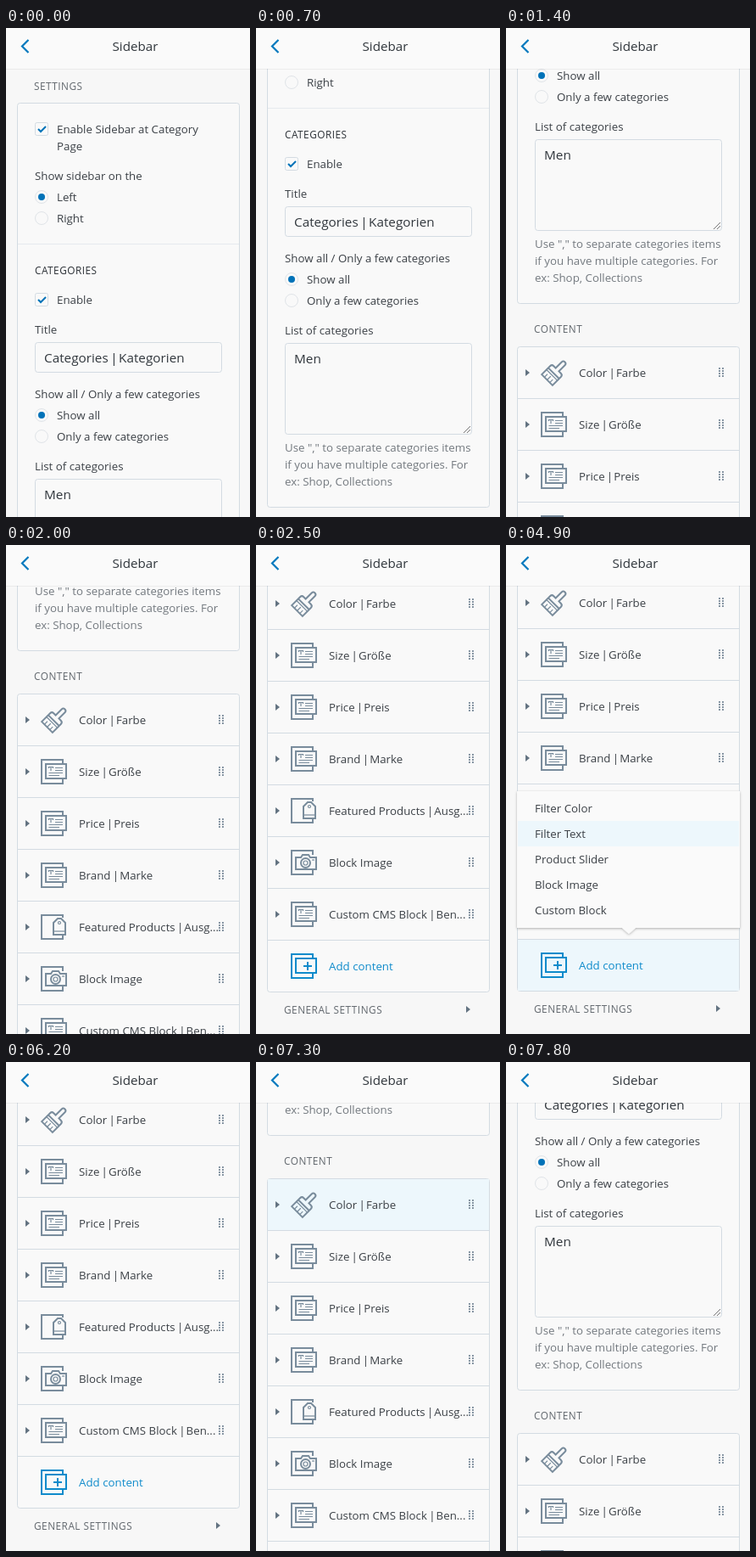
These frames come from a looping animation (288x576 px, 8 s). An HTML page:

```html
<!DOCTYPE html>
<html lang="en">
<head>
<meta charset="utf-8">
<style>
  html, body { margin: 0; width: 100%; height: 100%; overflow: hidden; background: #f7f7f7; }
  svg { display: block; }
  text { font: 13.3px "Open Sans", "Noto Sans", sans-serif; fill: #3b4046; white-space: pre; }
  .big { font-size: 15.3px; fill: #31373d; }
  .caps { font-size: 11.8px; letter-spacing: .5px; }
  .head { fill: #61676d; }
  .dark { fill: #2b3036; }
  .help { fill: #73797f; }
  .title { font-size: 15.2px; font-weight: 500; fill: #31373d; }
  .add { fill: #0f8bcb; }
  .card { fill: #f9f9f9; stroke: #d3dbe2; }
  .field { fill: #f9f9f9; stroke: #d3dbe2; }
  .ring { fill: #f9f9f9; stroke: #e0e4e8; }
  .line { stroke: #d3dbe2; }
  .faint { stroke: #e6eaee; }
  .icon { fill: none; stroke: #798c9c; stroke-width: 2; }
  .icon.add { fill: none; stroke: #0f8bcb; }
  .thin { stroke-width: 1.2; }
  .caret { fill: #637381; }
  .hot { fill: #edf7fc; }
</style>
</head>
<body>
<svg id="stage" width="288" height="576"></svg>
<script>
const LOOP = 8000, TICK = 100, END = 738;
const ROW = 61, LIST = 775;

// Text is placed by the middle of its capitals.
const text = (x, y, s, cls = '', drop = 5) =>
  `<text x="${x}" y="${y + drop}" class="${cls}">` +
  s.replace('| ', '<tspan dx="-.09em">|</tspan><tspan dx="-.18em"> </tspan>') + '</text>';
const caps = (x, y, s, cls = 'head') => text(x, y, s, 'caps ' + cls, 4);
const box = (x, y, w, h, cls, r = 3) =>
  `<rect x="${x + .5}" y="${y + .5}" width="${w - 1}" height="${h - 1}" rx="${r}" class="${cls}"/>`;
const rule = (y, cls = 'line') => `<path d="M14 ${y + .5}H275" class="${cls}"/>`;
const caret = (x, y) => `<path d="M${x} ${y - 4}l5 4l-5 4z" class="caret"/>`;

const check = (y, s) => box(34, y - 8, 16, 16, 'field', 2) +
  `<path d="M38 ${y}l3 3l6-6" fill="none" stroke="#0072b8" stroke-width="2"/>` + text(60, y, s);
const radio = (y, s, on) => `<circle cx="42" cy="${y}" r="7.5" class="ring"/>` +
  (on ? `<circle cx="42" cy="${y}" r="4" fill="#0072b8"/>` : '') + text(60, y, s);

const back = '<path d="M26 6V1H1V29H26V23"/>';
const front = back + '<path d="M6 6H30V23H6z"/>';
const icons = {
  brush: `<g transform="translate(16 15) rotate(45)">
    <path d="M-9 12V-2q0-3 3-3H-2.7V-15a2.7 2.7 0 0 1 5.4 0V-5H6q3 0 3 3V12zM-9 1H9"/>
    <path class="thin" d="M-9 4H9M-4.5 12V7M0 12V6M4.5 12V7"/></g>`,
  block: front + '<path class="thin" d="M9.5 11V9.5H14.5V11M12 9.5V14M17 10.5H26M17 13.5H26M9.5 16.5H26M9.5 19.5H22"/>',
  tag: '<path d="M26 4V1H1V29H26V25M15 24V10L20 5H24L29 10V24z"/><circle class="thin" cx="22" cy="10" r="1.5"/><path class="thin" d="M15 20H29"/>',
  camera: back + '<path d="M6 9H12L14 6H21L23 9H30V23H6z"/><circle cx="17.5" cy="15.5" r="5.5"/><circle class="thin" cx="17.5" cy="15.5" r="2.5"/><path class="thin" d="M25 12H28"/>',
  plus: front + '<path d="M20 10V20M15 15H25"/>'
};
const icon = (name, y, cls = '') =>
  `<g class="icon ${cls}" transform="translate(41 ${y - 15})">${icons[name]}</g>`;

const grip = y => {
  let d = '';
  for (let r = 0; r < 4; r++) d += `M251 ${y - 6 + r * 3}h2v2h-2zm4 0h2v2h-2z`;
  return `<path d="${d}" fill="#8796a3"/>`;
};
const items = [
  ['brush', 'Color | Farbe'], ['block', 'Size | Größe'], ['block', 'Price | Preis'],
  ['block', 'Brand | Marke'], ['tag', 'Featured Products | Ausg...'],
  ['camera', 'Block Image'], ['block', 'Custom CMS Block | Ben...']
];
const row = ([name, label], i) => {
  const y = LIST + 31 + ROW * i;
  return caret(23, y) + icon(name, y) + text(86, y, label) + grip(y) + rule(LIST + ROW * (i + 1));
};
const hot = (id, y, h) => `<rect id="${id}" x="14" y="${y}" width="261" height="${h}" class="hot"/>`;

const settings = box(13, 88, 263, 637, 'card') +
  check(119, 'Enable Sidebar at Category') + text(60, 139, 'Page') +
  text(34, 174, 'Show sidebar on the') + radio(199, 'Left', true) + radio(224, 'Right') +
  rule(254, 'faint') + caps(34, 286, 'CATEGORIES', 'dark') + check(320, 'Enable') +
  text(34, 355, 'Title') + box(34, 370, 221, 36, 'field') +
  text(45, 388, 'Categories | Kategorien', 'big', 5.5) +
  text(34, 431, 'Show all / Only a few categories') +
  radio(456, 'Show all', true) + radio(481, 'Only a few categories') +
  text(34, 516, 'List of categories') + box(34, 531, 221, 108, 'field') +
  text(45, 549, 'Men', 'big', 5.5) +
  '<path d="M245 637l8-8M249 637l4-4" stroke="#777"/>' +
  ['Use "," to separate categories items', 'if you have multiple categories. For',
   'ex: Shop, Collections'].map((s, i) => text(34, 654 + 20 * i, s, 'help')).join('');

const content = box(13, LIST, 263, ROW * 8 + 1, 'card') +
  hot('rowHot', LIST + 1, ROW - 1) + hot('addHot', LIST + ROW * 7 + 1, ROW - 1) +
  items.map(row).join('') +
  icon('plus', 1233, 'add') + text(86, 1233, 'Add content', 'add');

const menu = `<g id="popover" transform="translate(0 ${END})">
  <path d="M13 290H276V451H153L145 458L137 451H13z" fill="#fafafa" filter="url(#shade)"/>` +
  hot('itemHot', 325, 30) +
  ['Filter Color', 'Filter Text', 'Product Slider', 'Block Image', 'Custom Block']
    .map((s, i) => text(34, 310 + 30 * i, s)).join('') + '</g>';

stage.innerHTML = `<filter id="shade" x="-10%" y="-10%" width="120%" height="120%">
    <feDropShadow dx="0" dy="1" stdDeviation="1.5" flood-opacity=".3"/></filter>
  <g id="page">${caps(33, 69, 'SETTINGS')}${settings}${caps(33, 755, 'CONTENT')}${content}
    ${caps(33, 1285, 'GENERAL SETTINGS')}${caret(248, 1284)}${menu}</g>
  <rect width="288" height="48" fill="#fafafa"/>
  <path d="M0 48.5H288" stroke="#000" stroke-opacity=".05"/>
  <path d="M26.5 14L19 21.5L26.5 29" fill="none" stroke="#0078bd" stroke-width="2.2"/>
  ${text(125.5, 21.5, 'Sidebar', 'title')}`;

// Each wheel turn: start time, offset reached at every tick from there on.
const turns = [
  [500, 30, 95, 160, 200], [1100, 230, 295, 360, 400], [1700, 430, 495, 560, 600],
  [2300, 630, 695, 737, END], [6600, 688, 638], [7500, 593, 488, 383, 338]
];
const scrollAt = t => {
  let y = 0;
  for (const [start, ...stops] of turns)
    if (t >= start) y = stops[Math.min((t - start) / TICK, stops.length - 1)];
  return y;
};
const menuAt = t => t < 4200 || t >= 6200 ? 0 : t >= 6100 ? .4 : Math.min(1, (t - 4100) / 300);
const show = (el, on) => el.setAttribute('opacity', +on);

function draw() {
  const t = Math.floor(performance.now() % LOOP / TICK) * TICK;
  page.setAttribute('transform', `translate(0 ${-scrollAt(t)})`);
  show(popover, menuAt(t));
  show(addHot, t >= 3700 && t < 6200);
  show(itemHot, t >= 4900 && t < 6200);
  show(rowHot, t >= 7300 && t < 7500);
  requestAnimationFrame(draw);
}
const [page, popover, addHot, itemHot, rowHot] =
  ['page', 'popover', 'addHot', 'itemHot', 'rowHot'].map(id => document.getElementById(id));
draw();
</script>
</body>
</html>
```
